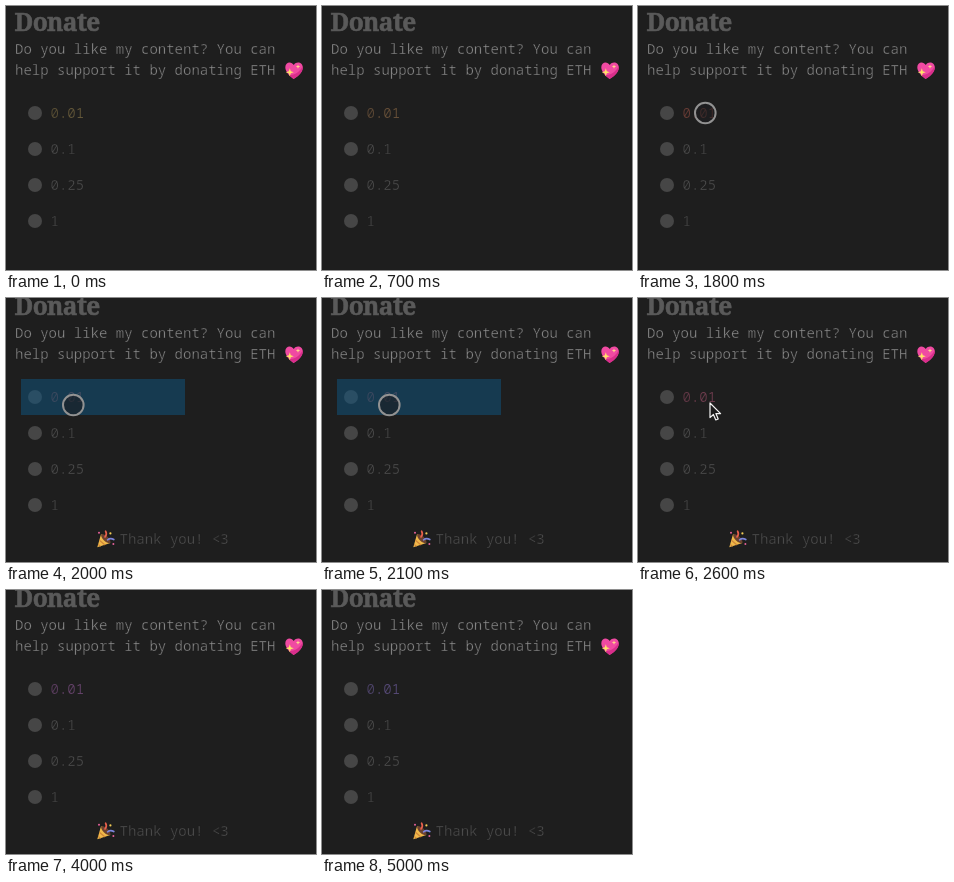
Animation, 310 px wide and 264 px high, one loop 5.1 s. Source, as an HTML page:

```html
<!DOCTYPE html>
<html lang="en">
<head>
<meta charset="utf-8">
<title>Donate</title>
<style>
  html, body { margin: 0; width: 100%; height: 100%; overflow: hidden; background: #1e1e1e; }
  svg { display: block; }
  /* a background-coloured stroke keeps the letters thin */
  text {
    font: 200 14px "Noto Sans Mono", "DejaVu Sans Mono", monospace;
    fill: #505050; stroke: #1e1e1e; stroke-width: .35px; white-space: pre;
  }
  .title {
    font: 700 24.5px "Noto Serif", "Liberation Serif", serif;
    fill: #5a5a5a; stroke: #5a5a5a; stroke-width: .6px; letter-spacing: -.6px;
  }
  .intro { fill: #8c8c8c; }
  .coin { fill: #464646; }

  .page, .thanks, .tap, .ring, .arrow { animation: 5100ms step-end infinite; }
  .page { animation-name: shift; }
  .thanks { animation-name: thanks; }
  .tap { animation-name: tap; }
  .ring { animation-name: ring; }
  .arrow { animation-name: arrow; }
  .picked { font-weight: 400; stroke-width: .15px; animation: hue 5100ms linear infinite; }
  .dim { fill-opacity: .85; }

  @keyframes shift { 0% { transform: none; } 39.2%, 100% { transform: translateY(-8px); } }
  @keyframes thanks { 0% { opacity: 0; } 39.2%, 100% { opacity: 1; } }
  @keyframes tap { 0% { opacity: 0; } 39.2% { opacity: 1; } 45.09%, 100% { opacity: 0; } }
  @keyframes ring { 0% { opacity: 0; } 31.37% { opacity: 1; } 49.01%, 100% { opacity: 0; } }
  @keyframes arrow {
    0% { opacity: 0; transform: translate(56px, 105px); }
    17.64% { opacity: 1; transform: translate(56px, 105px); }
    31.37% { opacity: 0; transform: translate(56px, 105px); }
    49.01% { opacity: 1; transform: translate(72px, 105px); }
    56.86%, 100% { opacity: 0; transform: translate(72px, 105px); }
  }
  @keyframes hue {
    0% { fill: #64583a; animation-timing-function: steps(13); }
    25.49% { fill: #694a38; animation-timing-function: steps(5); }
    35.29% { fill: #75423a; animation-timing-function: steps(8); }
    50.98% { fill: #6e3d4e; animation-timing-function: steps(14); }
    78.43% { fill: #65436a; animation-timing-function: steps(10); }
    98.03%, 100% { fill: #564a76; }
  }
</style>
</head>
<body>
<svg width="310" height="264" viewBox="0 0 310 264">
  <g class="page">
    <text class="title" x="8.5" y="25">Donate</text>
    <text class="intro" x="9" y="48">Do you like my content? You can</text>
    <text class="intro" x="9" y="69">help support it by donating ETH</text>

    <g transform="translate(279 55)">
      <path d="M8.6 18C4.5 15 .3 10.6 .3 6.2C.3 .9 6.3 -.3 8.8 4C11.6 -.2 17.8 1.4 17.8 6.6C17.8 11.3 13 15.4 8.6 18Z" fill="#f04aa2"/>
      <path d="M8.6 18C6.9 16.8 5.3 15.4 3.8 13.8C10 14.6 14.6 11 17.6 5.2C18.6 10.8 13.2 15.3 8.6 18Z" fill="#d92e8b"/>
      <path d="M4.8 7.2L5.8 10.2L8.8 11.2L5.8 12.2L4.8 15.2L3.8 12.2L.8 11.2L3.8 10.2Z" fill="#ffe169"/>
      <path d="M13 3.4L13.6 5L15.2 5.6L13.6 6.2L13 7.8L12.4 6.2L10.8 5.6L12.4 5Z" fill="#ffd88a"/>
    </g>

    <circle class="coin" cx="29" cy="107" r="7"/>
    <circle class="coin" cx="29" cy="143" r="7"/>
    <circle class="coin" cx="29" cy="179" r="7"/>
    <circle class="coin" cx="29" cy="215" r="7"/>
    <text class="picked" x="44.5" y="112"><tspan class="dim">0.</tspan>01</text>
    <text x="44.5" y="148">0.1</text>
    <text x="44.5" y="184">0.25</text>
    <text x="44.5" y="220">1</text>

    <rect class="tap" x="15" y="89" width="164" height="36" fill="rgba(14,86,130,.5)"/>

    <g class="thanks">
      <g transform="translate(91 240)">
        <path d="M.3 17.2L4 4.2Q11.4 7.4 13.4 13Z" fill="#f0b94a"/>
        <path d="M1.2 14.4L3.6 16.4M2.4 10.2L8 15" stroke="#d0863a" stroke-width="1.2"/>
        <ellipse cx="8.8" cy="8.6" rx="6" ry="2.5" transform="rotate(44 8.8 8.6)" fill="#6b4230"/>
        <g fill="none" stroke-width="1.7" stroke-linecap="round">
          <path d="M8 7Q10.4 4.4 8.6 1.2" stroke="#e8604c"/>
          <path d="M10.6 9.8Q13.4 7.6 16.8 9.6" stroke="#7d86dc"/>
        </g>
        <circle cx="2" cy="2.8" r="1" fill="#e5609a"/>
        <circle cx="13.4" cy="3.4" r="1.1" fill="#f2cc55"/>
        <circle cx="16.4" cy="14" r="1" fill="#e5609a"/>
      </g>
      <text x="113.5" y="254">Thank you! &lt;3</text>
    </g>
  </g>

  <circle class="ring" cx="67.3" cy="107" r="10.3" fill="rgba(28,28,32,.6)" stroke="#929292" stroke-width="2"/>
  <path class="arrow" d="M0 0V14.6L3.4 11.5L5.8 17L8.2 16L5.9 10.6H10.6Z" fill="#1c1c1c" stroke="#f4f4f4" stroke-width="1.2" stroke-linejoin="round"/>
</svg>
</body>
</html>
```
